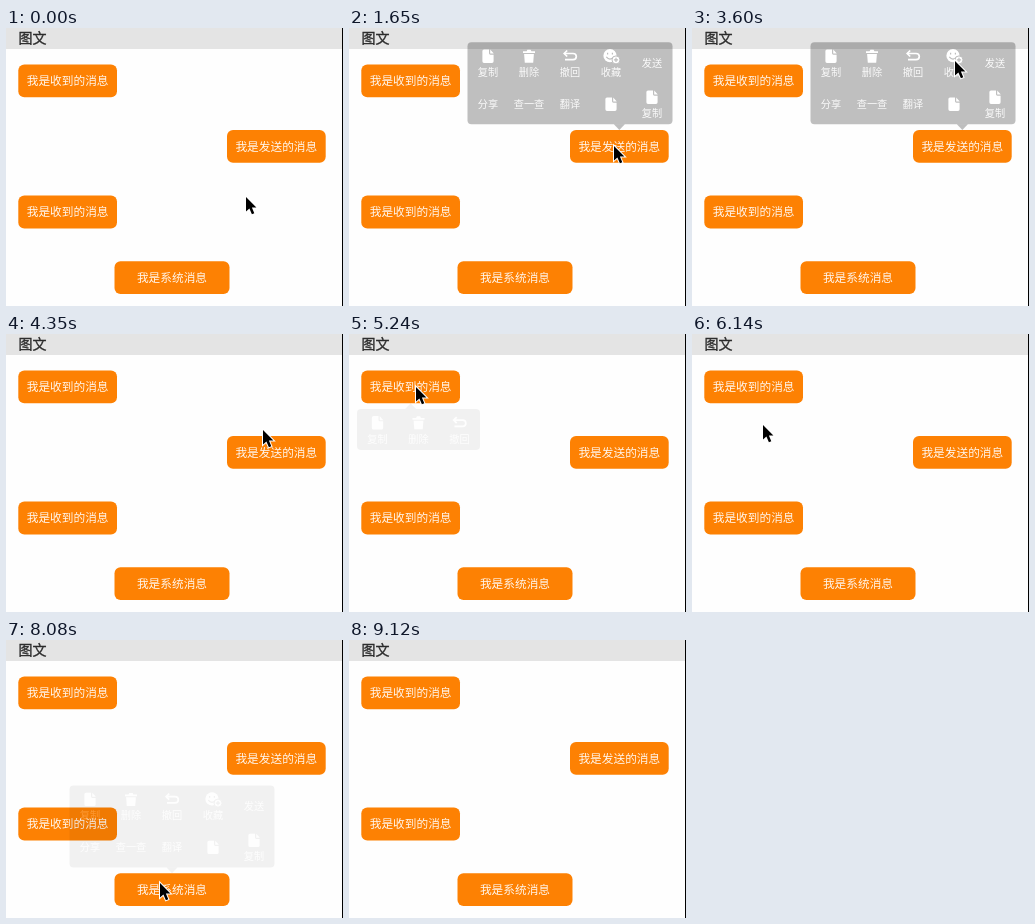
Animation of 337x278 px, one loop 9.22 s. Source, as an HTML page:

```html
<!DOCTYPE html>
<html lang="zh-CN">
<head>
<meta charset="utf-8">
<title>图文</title>
<style>
  html, body { margin: 0; width: 100%; height: 100%; overflow: hidden; background: #fefefe; }
  svg { display: block; }
  text { font-family: "Noto Sans CJK SC", "Noto Sans CJK", "Noto Sans CJK JP", sans-serif; }
</style>
</head>
<body>
<svg id="stage" width="337" height="278" viewBox="0 0 337 278">
  <defs>
    <path id="doc" fill="#fff" d="M-4-6.8H1V-3Q1-1.6 2.4-1.6H5.6V5Q5.6 6.6 4 6.6H-4Q-5.6 6.6-5.6 5V-5.2Q-5.6-6.8-4-6.8ZM2.2-6.8 5.6-3V-2.7H2.2Z"/>
    <path id="trash" fill="#fff" d="M-6-5H-2.4L-1.6-6.6H1.6L2.4-5H6V-3.2H-6ZM-4.9-2.2H4.9L4.2 6.4H-4.2Z"/>
    <g id="undo" fill="none" stroke="#fff" stroke-width="1.7">
      <path d="M-2.8-5.8-5.8-2.8-2.8.2"/>
      <path d="M-5.6-2.8H3C7.4-2.8 7.4 3.4 3 3.4H-5"/>
    </g>
    <g id="smile">
      <circle cx="-1" cy="-.6" r="6.6" fill="#fff"/>
      <g fill="none" stroke="#bebebe" stroke-width="1.2">
        <path d="M-4.7.6Q-1 5 2.7.6"/>
        <path d="M-3.4-3.6V-1.8M1.4-3.6V-1.8"/>
      </g>
      <circle cx="5" cy="3.6" r="4" fill="#fff" stroke="#bebebe"/>
      <path d="M5 1.5V5.7M2.9 3.6H7.1" stroke="#bebebe" stroke-width="1.2"/>
    </g>
  </defs>
</svg>
<script>
const LOOP = 9220, TICK = 148;
const CELL = 41, COLUMNS = 5, GAP = 5.7, BUBBLE_HEIGHT = 32.8;
const stage = document.getElementById('stage');

function add(parent, tag, attrs, content) {
  const el = document.createElementNS('http://www.w3.org/2000/svg', tag);
  for (const name in attrs) el.setAttribute(name, attrs[name]);
  if (content) el.textContent = content;
  return parent.appendChild(el);
}

function label(parent, content, x, y, size, attrs = {}) {
  return add(parent, 'text', {
    x, y: y + size * .38, 'font-size': size, fill: '#fff', 'fill-opacity': .92,
    'text-anchor': 'middle', ...attrs
  }, content);
}

function makeBubble(content, x, y, width, itemCount) {
  add(stage, 'rect', { x, y, width, height: BUBBLE_HEIGHT, rx: 6, fill: '#fd8103' });
  label(stage, content, x + width / 2, y + BUBBLE_HEIGHT / 2, 11.7);
  return { y, center: x + width / 2, itemCount };
}

const ITEMS = [
  ['复制', 'doc'], ['删除', 'trash'], ['撤回', 'undo'], ['收藏', 'smile'], ['发送'],
  ['分享'], ['查一查'], ['翻译'], ['', 'doc'], ['复制', 'doc']
];

// The menu sits above its bubble, or below it when there is no room.
function makeMenu({ y: bubbleY, center, itemCount }, pressed = 0) {
  const width = Math.min(itemCount, COLUMNS) * CELL;
  const height = Math.ceil(itemCount / COLUMNS) * CELL;
  const x = Math.max(8, Math.min(323.5 - width, center - width / 2));
  const below = bubbleY < height + GAP;
  const y = below ? bubbleY + BUBBLE_HEIGHT + GAP : bubbleY - GAP - height;
  const base = below ? y : y + height;
  const peak = base + (below ? -GAP : GAP);

  const group = add(stage, 'g', { opacity: 0 });
  const shade = { fill: '#000', 'fill-opacity': .25 };
  add(group, 'rect', { x, y, width, height, rx: 4, ...shade });
  add(group, 'path', { d: `M${center - 5.5} ${base}L${center} ${peak}L${center + 5.5} ${base}Z`, ...shade });

  const cellX = i => x + i % COLUMNS * CELL;
  const cellY = i => y + Math.floor(i / COLUMNS) * CELL;
  const mark = add(group, 'rect', {
    x: cellX(pressed), y: cellY(pressed), width: CELL, height: CELL,
    fill: '#000', 'fill-opacity': .16, opacity: 0
  });

  ITEMS.slice(0, itemCount).forEach(([name, icon], i) => {
    const cx = cellX(i) + CELL / 2, cy = cellY(i) + CELL / 2;
    const stacked = name && icon;
    if (icon) add(group, 'use', { href: '#' + icon, x: cx, y: stacked ? cy - 6.5 : cy + .5 });
    if (name) label(group, name, cx, stacked ? cy + 9.5 : cy + .5, 10.2);
  });
  return { group, mark };
}

add(stage, 'rect', { width: 337, height: 278, fill: '#fefefe' });
add(stage, 'rect', { width: 336, height: 21, fill: '#e4e4e4' });
label(stage, '图文', 12.5, 9.7, 14, {
  fill: '#2b2b2b', 'fill-opacity': 1, stroke: '#2b2b2b', 'stroke-width': .35, 'text-anchor': 'start'
});
add(stage, 'rect', { x: 336, width: 1, height: 278, fill: '#000' });

const received = makeBubble('我是收到的消息', 12.3, 36.4, 98.7, 3);
const sent = makeBubble('我是发送的消息', 221, 102, 98.7, 10);
const receivedAgain = makeBubble('我是收到的消息', 12.3, 167.6, 98.7, 3);
const system = makeBubble('我是系统消息', 108.5, 233.2, 115, 10);

const showings = [
  { bubble: sent, show: 1500, hide: 2250 },
  { bubble: sent, show: 3150, hide: 4200, press: 3900, pressed: 3 },
  { bubble: received, show: 5240, hide: 5990, press: 5690, pressed: 1 },
  { bubble: receivedAgain, show: 7180, hide: 7630 },
  { bubble: system, show: 8080, hide: 8530 }
].map(s => ({ ...s, ...makeMenu(s.bubble, s.pressed) }));

const cursor = add(stage, 'path', {
  d: 'M0 0V14.6L3.4 11.5 5.9 17.2 8.3 16.2 5.9 10.6H10.4Z',
  fill: '#000', stroke: '#fff', 'stroke-width': 2, 'paint-order': 'stroke'
});

// Each leg runs from the end of the one before, along a curve pulled towards bend.
const HOME = [240, 169], POINTER_GONE = 8820;
const legs = [
  { start: 300, steps: 2, to: [266, 121] },
  { start: 750, steps: 2, to: [265, 118] },
  { start: 1800, steps: 3, to: [234, 173] },
  { start: 2550, steps: 3, to: [261, 123] },
  { start: 3450, steps: 2, to: [263, 33] },
  { start: 4350, steps: 1, to: [257, 96] },
  { start: 4490, steps: 4, to: [67, 53], bend: [130, 242] },
  { start: 5540, steps: 1, to: [71, 91] },
  { start: 6290, steps: 6, to: [70, 179], bend: [186, 258] },
  { start: 7480, steps: 4, to: [154, 243], bend: [282, 216] },
  { start: 8380, steps: 2, to: [292, 244] }
];

function pointerAt(t) {
  let from = HOME;
  for (const { start, steps, to, bend } of legs) {
    if (t < start) break;
    const p = Math.min(1, (Math.floor((t - start) / TICK) + 1) / steps);
    const origin = from;
    from = to.map((end, axis) => {
      const pull = bend ? bend[axis] : (origin[axis] + end) / 2;
      return (1 - p) ** 2 * origin[axis] + 2 * p * (1 - p) * pull + p * p * end;
    });
  }
  return from;
}

function opacityAt(t, { show, hide }) {
  if (t < show || t >= hide + TICK) return 0;
  return t >= show + TICK && t < hide ? 1 : .2;
}

function render(t) {
  cursor.setAttribute('transform', `translate(${pointerAt(t).join(' ')})`);
  cursor.setAttribute('opacity', t < POINTER_GONE ? 1 : 0);
  for (const s of showings) {
    s.group.setAttribute('opacity', opacityAt(t, s));
    s.mark.setAttribute('opacity', t >= s.press ? 1 : 0);
  }
}

const begin = performance.now();
function tick() {
  render((performance.now() - begin) % LOOP);
  requestAnimationFrame(tick);
}
tick();
</script>
</body>
</html>
```
